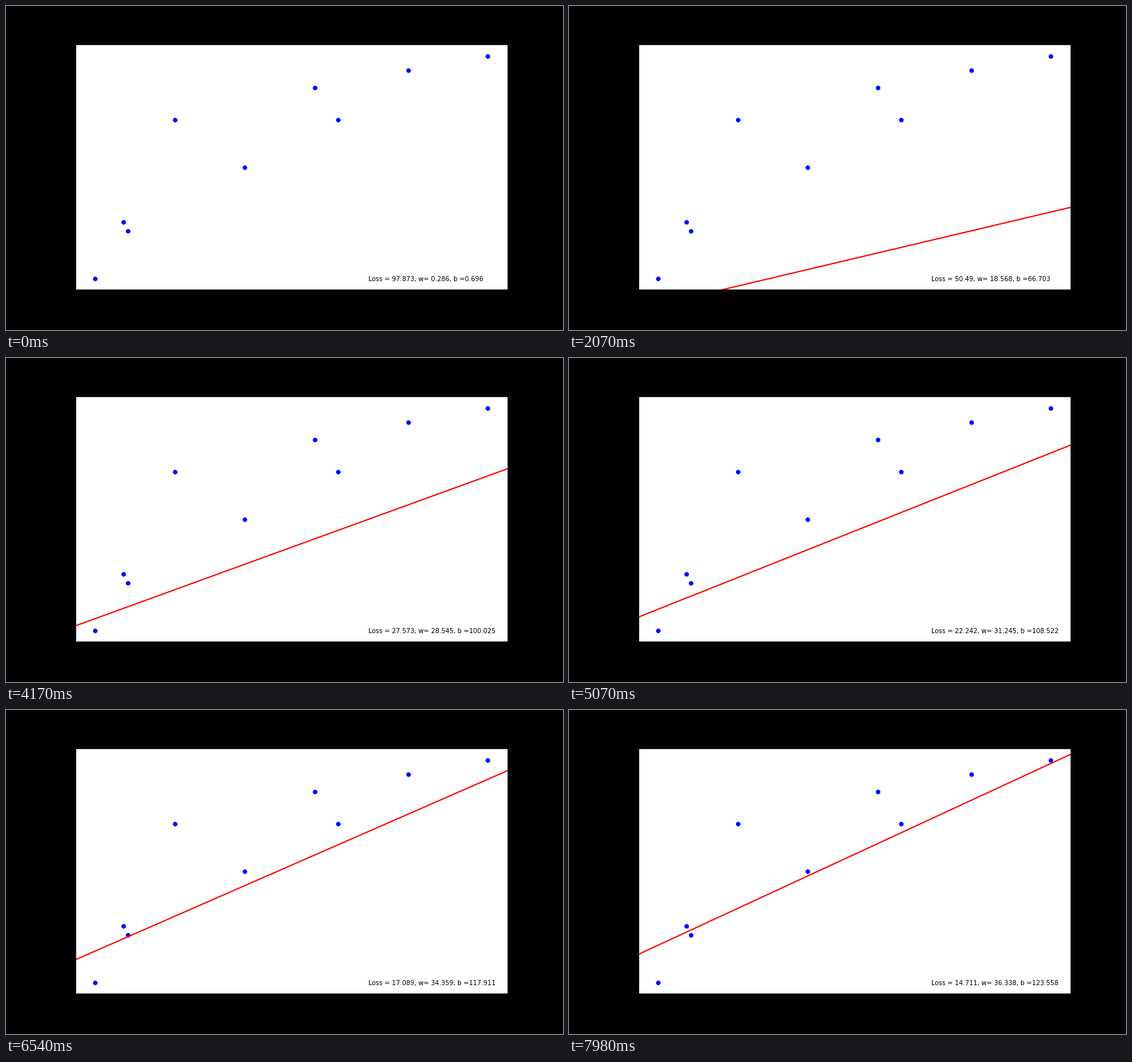
A matplotlib script for the animation above (8 s loop, 864 px wide and 504 px high).

```python
import numpy as np
import matplotlib.pyplot as plt
from matplotlib.animation import FuncAnimation

RATE = 0.01
W0, B0 = 0.28613933, 0.69646919
TICK, FRAMES = 20, 400  # ms per drawn frame, 8 s loop
STEPS = 267             # one descent step every 30 ms

raw = np.array([0, 6, 7, 17, 32, 47, 52, 67, 84], float)
x = (raw - raw.mean()) / raw.std(ddof=1)
y = np.array([60, 92, 87, 150, 123, 168, 150, 178, 186], float)


def descend(w, b):
    """Batch gradient descent; returns (loss, w, b) before each step."""
    history = []
    for _ in range(STEPS):
        err = w * x + b - y
        history.append((np.sqrt(np.mean(err ** 2) / 2), w, b))
        w -= RATE * np.mean(err * x)
        b -= RATE * np.mean(err)
    return history


def padded(values, margin=0.05):
    pad = margin * np.ptp(values)
    return values.min() - pad, values.max() + pad


history = descend(W0, B0)

fig = plt.figure(figsize=(12, 7), dpi=72, facecolor="black")
fig.subplots_adjust(left=0.125, right=0.9, bottom=0.125, top=0.88)
ax = fig.add_subplot()
ax.set(xlim=padded(x), ylim=padded(y), xticks=[], yticks=[])
ax.plot(x, y, "bo", markersize=6)
span = np.array(ax.get_xlim())
line, = ax.plot(span, span, "r-", lw=2)
label = ax.text(0.8, 58.43, "", fontsize=10, family="DejaVu Sans")


def update(i):
    loss, w, b = history[(2 * i + 1) // 3]
    line.set_ydata(w * span + b)
    loss, w, b = (round(float(v), 3) for v in (loss, w, b))
    label.set_text(f"Loss = {loss}, w= {w}, b ={b}")
    return line, label


anim = FuncAnimation(fig, update, frames=FRAMES, interval=TICK,
                     init_func=lambda: update(0), repeat=True, repeat_delay=0)
plt.show()
```
